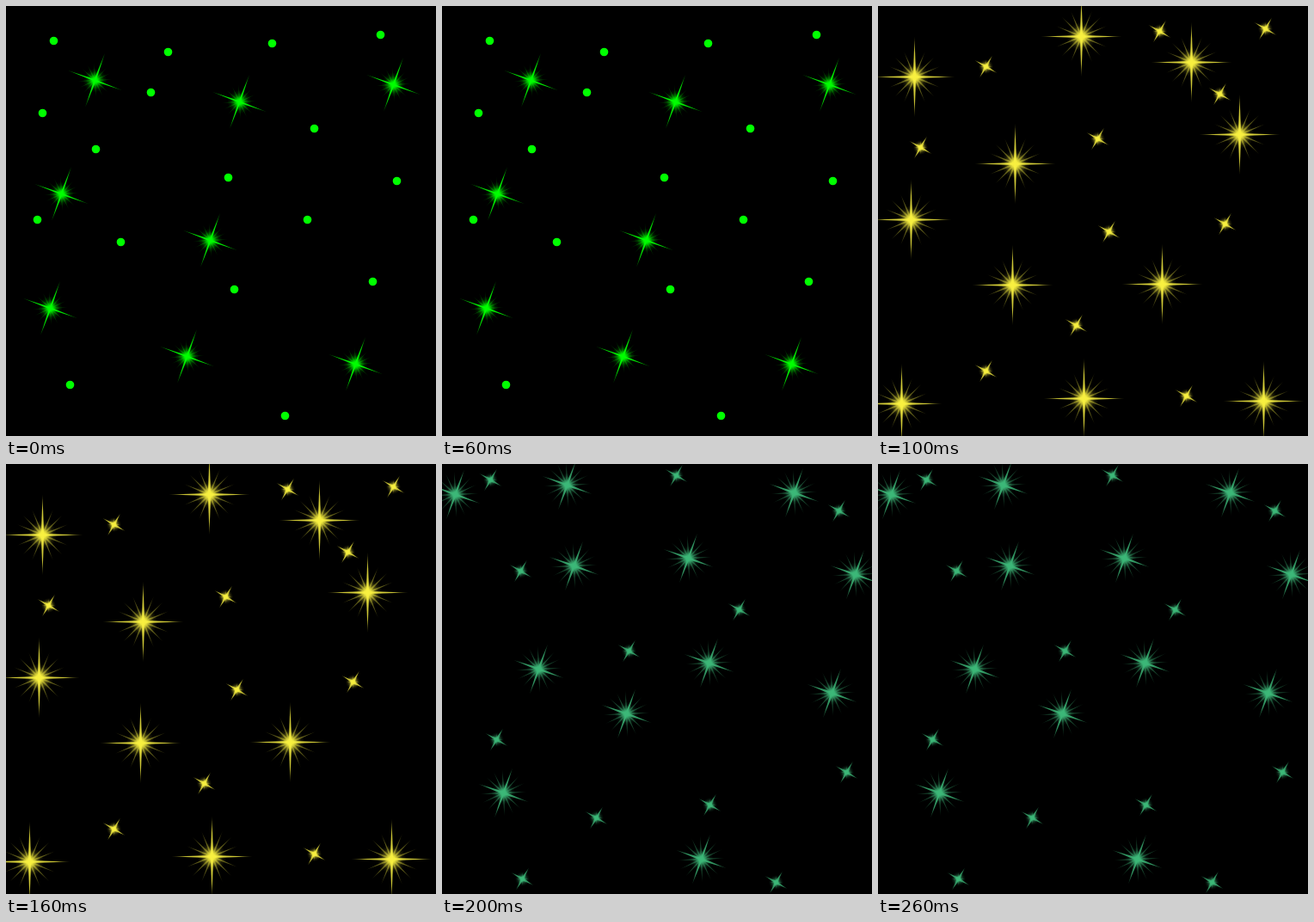
These frames come from a looping animation (500 px wide and 500 px high, 300 ms). An HTML page:

```html
<!DOCTYPE html>
<html lang="en">
<head>
<meta charset="utf-8">
<title>Twinkling stars</title>
<style>
  html, body { margin: 0; width: 100%; height: 100%; overflow: hidden; background: #000; }
  svg { display: block; width: 500px; height: 500px; }
  .layer { opacity: 0; animation: blink 300ms step-end infinite; }
  .layer:nth-of-type(2) { animation-delay: -200ms; }
  .layer:nth-of-type(3) { animation-delay: -100ms; }
  @keyframes blink {
    0% { opacity: 1; }
    33.3333%, 100% { opacity: 0; }
  }
</style>
</head>
<body>
<svg id="sky" viewBox="0 0 500 500"></svg>
<script>
// rays: [first angle, angle step, count, length, half width, opacity]
const smallStar = {
  glow: 8.5, core: 0.95,
  rays: [[30, 90, 2, 15, 1.5, 0.85], [0, 45, 4, 8, 1, 0.35]]
};

const layers = [
  {
    color: '#00ff00',
    kinds: [
      {
        shape: {
          glow: 14, core: 0.9,
          rays: [[20, 90, 2, 34, 1.15, 1], [42, 22.5, 3, 20, 0.9, 0.3], [132, 22.5, 3, 20, 0.9, 0.3]]
        },
        at: [103, 86, 271, 111, 450, 91, 64, 218, 237, 272, 51, 351, 210, 407, 406, 416]
      },
      {
        shape: { dot: 4.8 },
        at: [55, 40, 188, 53, 309, 43, 435, 33, 168, 100, 42, 124, 104, 166, 358, 142, 258, 199,
          454, 203, 36, 248, 133, 274, 350, 248, 265, 329, 426, 320, 74, 440, 324, 476]
      }
    ]
  },
  {
    color: '#f8f040',
    kinds: [
      {
        shape: {
          glow: 17, core: 0.9,
          rays: [[0, 90, 2, 47, 1.6, 0.95], [22.5, 22.5, 3, 32, 1.3, 0.42], [112.5, 22.5, 3, 32, 1.3, 0.42]]
        },
        at: [42, 82, 236, 35, 364, 65, 420, 149, 159, 183, 38, 248, 156, 324, 330, 323,
          239, 456, 27, 462, 448, 459]
      },
      {
        shape: smallStar,
        at: [125, 70, 327, 29, 450, 26, 397, 102, 49, 164, 255, 154, 268, 262, 403, 253,
          230, 371, 125, 424, 358, 453]
      }
    ]
  },
  {
    color: '#3cb878',
    kinds: [
      {
        shape: {
          glow: 14, core: 0.9,
          rays: [[20, 90, 2, 31, 1.5, 0.9], [42.5, 22.5, 3, 27, 1.2, 0.42], [132.5, 22.5, 3, 27, 1.2, 0.42]]
        },
        at: [15, 35, 145, 24, 409, 33, 153, 118, 286, 109, 480, 128, 112, 238, 310, 231,
          214, 290, 453, 266, 71, 382, 301, 459]
      },
      {
        shape: smallStar,
        at: [56, 18, 272, 13, 461, 54, 91, 124, 345, 169, 217, 217, 63, 320, 470, 358,
          179, 411, 311, 396, 93, 482, 388, 486]
      }
    ]
  }
];

const gradient = (id, color, radius, stops) =>
  `<radialGradient id="${id}" gradientUnits="userSpaceOnUse" cx="0" cy="0" r="${radius}">` +
  stops.map(([offset, alpha]) =>
    `<stop offset="${offset}" stop-color="${color}" stop-opacity="${alpha}"/>`).join('') +
  '</radialGradient>';

function star(id, color, { dot, glow, core, rays }) {
  if (dot) return `<circle id="${id}" r="${dot}" fill="${color}"/>`;
  let defs = gradient(id + 'glow', color, glow, [[0, 1], [0.22, core], [0.5, 0.38], [0.75, 0.1], [1, 0]]);
  let body = `<circle r="${glow}" fill="url(#${id}glow)"/>`;
  rays.forEach(([first, step, count, length, width, alpha], i) => {
    const fill = `${id}ray${i}`;
    defs += gradient(fill, color, length, [[0, alpha], [0.6, alpha * 0.85], [1, alpha * 0.25]]);
    for (let k = 0; k < count; k++) {
      body += `<path d="M${-length} 0L0 ${-width}L${length} 0L0 ${width}Z" ` +
        `fill="url(#${fill})" transform="rotate(${first + k * step})"/>`;
    }
  });
  return `${defs}<g id="${id}">${body}</g>`;
}

function place(id, at) {
  let out = '';
  for (let i = 0; i < at.length; i += 2) {
    out += `<use href="#${id}" x="${at[i] + 0.5}" y="${at[i + 1] + 0.5}"/>`;
  }
  return out;
}

let defs = '', groups = '';
layers.forEach(({ color, kinds }, n) => {
  groups += '<g class="layer">';
  kinds.forEach(({ shape, at }, k) => {
    const id = `star${n}${k}`;
    defs += star(id, color, shape);
    groups += place(id, at);
  });
  groups += '</g>';
});
document.getElementById('sky').innerHTML = `<defs>${defs}</defs>${groups}`;
</script>
</body>
</html>
```
